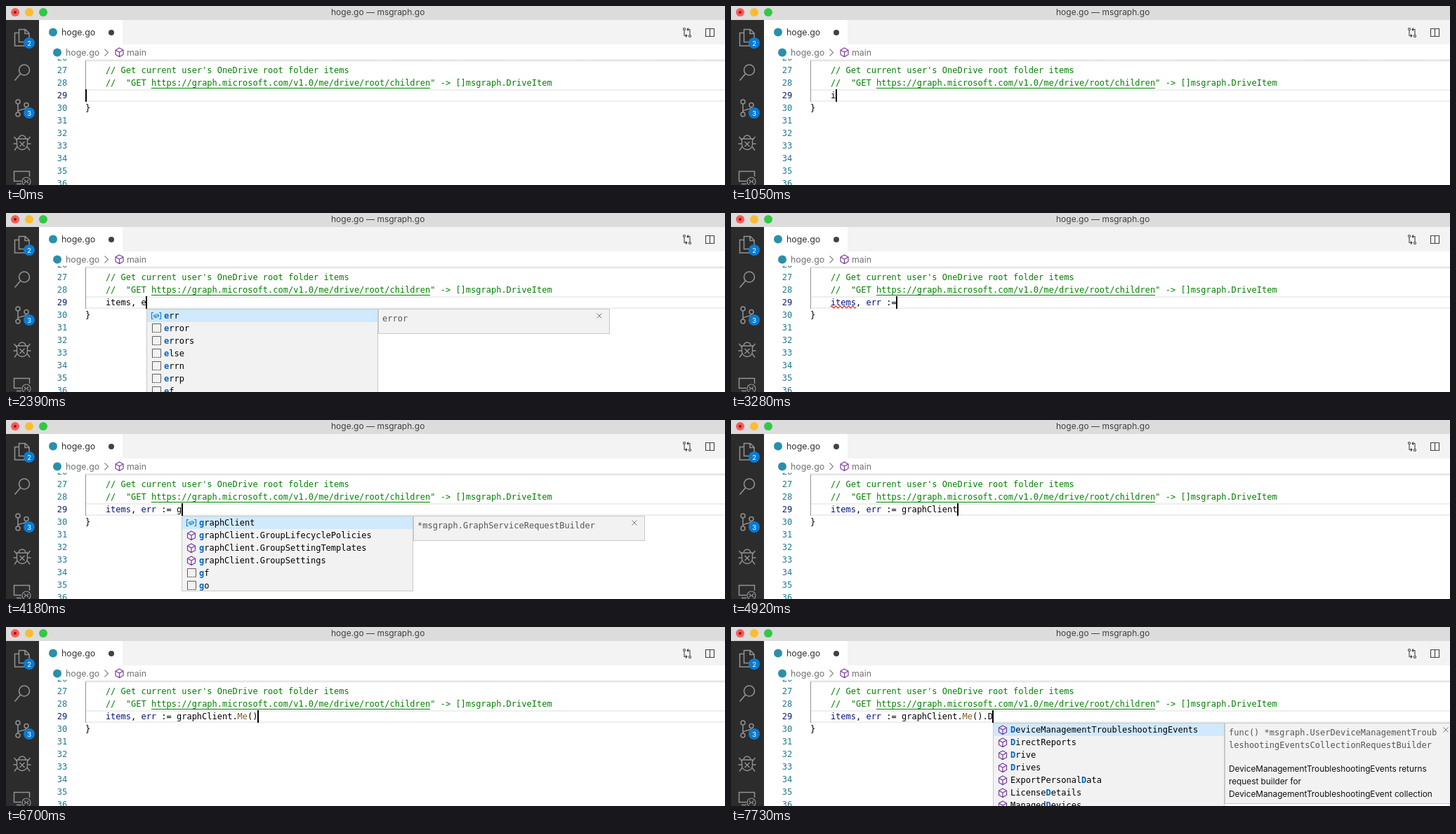
Write an HTML page with a canvas that moves like this. It is 1024 px wide and 256 px high and loops after 8 s.

```html
<!DOCTYPE html>
<html lang="en">
<head>
<meta charset="utf-8">
<title>Editor completion</title>
<style>
html, body { margin: 0; width: 100%; height: 100%; overflow: hidden; background: #fff; }
canvas { display: block; width: 1024px; height: 256px; }
</style>
</head>
<body>
<canvas id="stage" width="1024" height="256"></canvas>
<script>
const ctx = document.getElementById('stage').getContext('2d');
const LOOP = 8000, LEFT = 113, CHAR = 7.22, ROW = 18, LINE_TOP = 119;
const MONO = '12px "DejaVu Sans Mono", monospace';
const ui = size => `${size}px Inter, "Liberation Sans", sans-serif`;
const colX = col => LEFT + col * CHAR;

// Completion entries: icon kind, then the label with [matched] parts.
const bold = (n, prefix, kind, names) =>
  names.map(s => `${kind}:${prefix}[${s.slice(0, n)}]${s.slice(n)}`);
const itemList = n => [
  ...bold(n, 'user.Drive.', 'field', ['Items']),
  ...bold(n, 'msgraph.', 'struct', ['ItemActionStat', 'ItemActivityStat', 'ItemActivity',
    'ItemAnalytics', 'ItemAttachment', 'ItemBody'])
];
const itemsMatch = ['field:user.Drive.[Items]', 'struct:msgraph.[Item]Action[S]tat',
  'struct:msgraph.[Item]Activity[S]tat'];
const errList = n => [
  ...bold(n, '', 'var', ['err']),
  ...bold(n, '', 'keyword', ['error', 'errors'])
];
const eList = [...errList(1), ...bold(1, '', 'keyword', ['else', 'errn', 'errp', 'ef'])];
const graphList = n => [
  ...bold(n, '', 'var', ['graphClient']),
  ...bold(n, '', 'method', ['graphClient.GroupLifecyclePolicies',
    'graphClient.GroupSettingTemplates', 'graphClient.GroupSettings'])
];
const methods = names => names.map(s => 'method:' + s);
const clientList = methods(['AppCatalogs', 'AuditLogs', 'CertificateBasedAuthConfiguration',
  'Communications', 'Contracts', 'DataPolicyOperations', 'DeviceAppManagement']);
const userList = methods(['Activities', 'AgreementAcceptances', 'Analytics',
  'AppRoleAssignments', 'Authentication', 'Calendar', 'CalendarGroups']);
const dList = methods(['[D]eviceManagementTroubleshootingEvents', '[D]irectReports', '[D]rive',
  '[D]rives', 'ExportPersonal[D]ata', 'License[D]etails', 'Managed[D]evices']);

const itemsDoc = { sig: ['[]msgraph.DriveItem'], text: ['Items undocumented'] };
const errDoc = { sig: ['error'], text: [] };
const graphDoc = { sig: ['*msgraph.GraphServiceRequestBuilder'], text: [] };
const meDoc = { sig: ['func() *msgraph.UserRequestBuilder'], text: ['Me is navigation property'] };
const catalogDoc = { sig: ['func() *msgraph.AppCatalogsRequestBuilder'],
  text: ['AppCatalogs is navigation property'] };
const activityDoc = { sig: ['func() *msgraph.UserActivitiesCollection', 'RequestBuilder'],
  text: ['Activities returns request builder for', 'UserActivity collection'] };
const eventsDoc = {
  sig: ['func() *msgraph.UserDeviceManagementTroub', 'leshootingEventsCollectionRequestBuilder'],
  text: ['DeviceManagementTroubleshootingEvents returns', 'request builder for',
    'DeviceManagementTroubleshootingEvent collection']
};

const CALL = 'items, err := graphClient';
const steps = [
  { t: 0, text: null },
  { t: 300, text: '', off: 1 },
  { t: 600, text: '' },
  { t: 900, text: '', off: 1 },
  { t: 1050, text: 'i' },
  { t: 1200, text: 'it', list: itemList(2), doc: itemsDoc },
  { t: 1350, text: 'ite', list: itemList(3), doc: itemsDoc },
  { t: 1500, text: 'item', list: itemList(4), doc: itemsDoc },
  { t: 1640, text: 'items', list: itemsMatch },
  { t: 1790, text: 'items', list: itemsMatch, doc: itemsDoc },
  { t: 2240, text: 'items,' },
  { t: 2390, text: 'items, e', list: eList, doc: errDoc },
  { t: 2540, text: 'items, er', list: errList(2), doc: errDoc },
  { t: 2690, text: 'items, err', list: errList(3), doc: errDoc },
  { t: 2830, text: 'items, err ', wave: 'items' },
  { t: 3280, text: 'items, err :=', wave: 'items' },
  { t: 3430, text: 'items, err := ', wave: 'items' },
  { t: 3580, text: 'items, err := ', wave: 'brace' },
  { t: 4030, text: 'items, err := g' },
  { t: 4180, text: 'items, err := g', doc: graphDoc,
    list: [...graphList(1), ...bold(1, '', 'keyword', ['gf', 'go'])] },
  { t: 4320, text: 'items, err := gr', list: graphList(2), doc: graphDoc },
  { t: 4470, text: 'items, err := gra', list: graphList(3), doc: graphDoc },
  { t: 4920, text: CALL },
  { t: 5370, text: CALL + '.' },
  { t: 5520, text: CALL + '.', wave: 'brace' },
  { t: 5660, text: CALL + '.', wave: 'brace', list: clientList, doc: catalogDoc, bar: 1 },
  { t: 5810, text: CALL + '.M', doc: meDoc,
    list: methods(['[M]e', 'Device[M]anagement', 'DeviceApp[M]anagement']) },
  { t: 6100, text: CALL + '.Me', doc: meDoc,
    list: methods(['[Me]', 'Device[M]anag[e]ment', 'DeviceApp[M]anag[e]ment']) },
  { t: 6550, text: CALL + '.Me' },
  { t: 6700, text: CALL + '.Me()' },
  { t: 6850, text: CALL + '.Me()', off: 1 },
  { t: 7150, text: CALL + '.Me()' },
  { t: 7440, text: CALL + '.Me().' },
  { t: 7590, text: CALL + '.Me().', wave: 'brace', list: userList, doc: activityDoc },
  { t: 7730, text: CALL + '.Me().D', list: dList, doc: eventsDoc }
];

function rect(x, y, w, h, color) {
  ctx.fillStyle = color;
  ctx.fillRect(x, y, w, h);
}
function disc(x, y, r, color) {
  ctx.fillStyle = color;
  ctx.beginPath();
  ctx.arc(x, y, r, 0, 7);
  ctx.fill();
}
function label(text, x, y, color, font = MONO) {
  ctx.font = font;
  ctx.fillStyle = color;
  ctx.fillText(text, x, y);
}
function stroke(path, color, width = 1) {
  ctx.strokeStyle = color;
  ctx.lineWidth = width;
  ctx.stroke(new Path2D(path));
}
function panel(x, y, w, h) {
  rect(x, y, w, h, '#c8c8c8');
  rect(x + 1, y + 1, w - 2, h - 2, '#f2f2f2');
}

const PURPLE = '#7a3a9e', BLUE = '#1a85c9';
const icons = {
  method: () => stroke('M0-6L5.5-3V3.5L0 6.5L-5.5 3.5V-3ZM-5.5-3L0 0L5.5-3M0 0V6.5', PURPLE, 1.2),
  field: () => stroke('M-6.5-1L1-4.5L6.5-2V2L-1 5.5L-6.5 3ZM-6.5-1L-1 1.5L6.5-2M-1 1.5V5.5', BLUE, 1.2),
  struct: () => stroke('M-6.5-4.5H6.5V-1H-6.5ZM-6.5 2H-2V5.5H-6.5ZM2 2H6.5V5.5H2Z', '#505050', 1.1),
  var() {
    stroke('M-4-4.5H-6.5V4.5H-4M4-4.5H6.5V4.5H4', BLUE, 1.2);
    stroke('M-3.5-.5L1-2.5L3.5-1V1L-1 3L-3.5 1.5ZM-3.5-.5L-1 .8L3.5-1M-1 .8V3', BLUE);
  },
  keyword() {
    stroke('M-5.5 5.5V-6.5H6.5V5.5', '#606060');
    ctx.setLineDash([1.5, 1]);
    stroke('M-5.5 5.5H6.5', '#404040', 1.2);
    ctx.setLineDash([]);
  }
};
function icon(kind, x, y) {
  ctx.save();
  ctx.translate(x, y);
  icons[kind]();
  ctx.restore();
}

function drawChrome() {
  rect(0, 0, 1024, 20, '#dcdcdc');
  ['#fc5b57', '#fdbc2f', '#33c748'].forEach((c, i) => disc(13 + 20 * i, 9, 6, c));
  disc(13, 9, 2, '#8c1a10');
  label('hoge.go — msgraph.go', 463, 13, '#404040', ui(12));

  rect(47, 20, 977, 35, '#f3f3f3');
  rect(47, 20, 119, 35, '#fff');
  disc(67, 37.5, 6, '#2b8fab');
  label('hoge.go', 79, 42, '#333', ui(12.4));
  disc(150, 38, 4, '#424242');
  stroke('M966 35V42.5H970M968 40.5L970 42.5L968 44.5M974 41V33.5H970M972 31.5L970 33.5L972 35.5', '#424242', 1.1);
  stroke('M964.5 33a1.5 1.5 0 1 0 3 0a1.5 1.5 0 1 0-3 0M972.5 43a1.5 1.5 0 1 0 3 0a1.5 1.5 0 1 0-3 0', '#424242', 1.1);
  stroke('M996.5 32.5H1008.5V43.5H996.5ZM1002.5 32.5V43.5', '#424242', 1.1);

  disc(73, 66.5, 6, '#2b8fab');
  label('hoge.go', 85, 71, '#717171', ui(12.4));
  stroke('M140.5 61.5L145.5 66.5L140.5 71.5', '#808080', 1.1);
  icon('method', 161.5, 66);
  label('main', 172, 71, '#717171', ui(12.4));
}

function badge(text, y) {
  disc(33, y, 8, '#0a7bd2');
  label(text, 30.2, y + 3.5, '#fff', ui(9.5));
}
function drawSidebar() {
  const gray = '#929292';
  rect(0, 20, 47, 236, '#2c2c2c');
  stroke('M18.5 33.5H27.5L33 39V51.5H18.5ZM27 34V39.5H33M18 38.5H12.5V57H26.5V52', gray, 1.5);
  badge('2', 53);
  stroke('M18.5 91.5a7.5 7.5 0 1 0 15 0a7.5 7.5 0 1 0-15 0M20.5 97L12.5 106.5', gray, 1.6);
  stroke('M14 137a3 3 0 1 0 6 0a3 3 0 1 0-6 0M14 155a3 3 0 1 0 6 0a3 3 0 1 0-6 0M26 141.5a3 3 0 1 0 6 0a3 3 0 1 0-6 0M17 140V152M29 144.5C29 149 18 147 17 151', gray, 1.5);
  badge('3', 153);
  stroke('M15.5 190H30.5V198a7.5 7.5 0 0 1-15 0ZM18 190a5 5 0 0 1 10 0M15.5 192L11.5 187M30.5 192L34.5 187M15.5 197H10.5M30.5 197H35.5M16 201L12 206.5M30 201L34 206.5M19.5 194L26.5 201M26.5 194L19.5 201', gray, 1.4);
  stroke('M22 250.5H11.5V236.5H33.5V244M15 254.5H22', gray, 1.5);
  stroke('M23 251a6 6 0 1 0 12 0a6 6 0 1 0-12 0M26 248.5L28.3 251L26 253.5M32 248.5L29.7 251L32 253.5', gray, 1.2);
}

function drawEditor() {
  rect(47, 55, 977, 201, '#fff');
  for (let n = 26; n <= 36; n++) {
    label(n, 72.8, 132 + (n - 29) * ROW, n === 29 ? '#0b216f' : '#237893');
  }
  rect(47, 55, 66, 20.5, '#fff');
  const shade = ctx.createLinearGradient(0, 76, 0, 80);
  shade.addColorStop(0, 'rgba(0,0,0,0)');
  shade.addColorStop(.4, 'rgba(0,0,0,.13)');
  shade.addColorStop(1, 'rgba(0,0,0,0)');
  rect(LEFT, 76, 911, 4, shade);

  const green = '#008000';
  label("// Get current user's OneDrive root folder items", colX(4), 96, green);
  label('//  "GET https://graph.microsoft.com/v1.0/me/drive/root/children" -> []msgraph.DriveItem',
    colX(4), 114, green);
  rect(colX(13), 117, 55 * CHAR, 1, green);
  rect(LEFT, 119, 911, 2, '#eee');
  rect(LEFT, 135, 911, 2, '#eee');
  rect(LEFT, 78, 1, 41, '#939393');
  label('}', LEFT, 150, '#000');
}

function wave(x, y, width) {
  ctx.beginPath();
  for (let d = 0; d <= width; d += .5) ctx.lineTo(x + d, y - 1.4 * Math.sin(d * Math.PI / 3));
  ctx.strokeStyle = '#e51400';
  ctx.lineWidth = 1.1;
  ctx.stroke();
}

function drawCode(text) {
  const assign = text.indexOf(':=');
  for (const m of text.matchAll(/\w+|[^\w\s]+/g)) {
    const next = text[m.index + m[0].length];
    const isName = /\w/.test(m[0]);
    const color = isName && m.index < assign ? '#001080' : isName && next === '(' ? '#795e26' : '#000';
    label(m[0], colX(4 + m.index), 132, color);
  }
}

function drawList(x, list, bar) {
  panel(x, 137, 330, list.length * ROW);
  rect(x + 1, 138, 328, 18, '#d0e9fd');
  if (bar) rect(x + 319, 138, 10, 66, 'rgba(100,100,100,.12)');
  list.forEach((entry, i) => {
    const [kind, name] = entry.split(':');
    const y = 147 + i * ROW;
    let tx = x + 25;
    icon(kind, x + 14, y);
    name.split(/[\[\]]/).forEach((part, j) => {
      label(part, tx, y + 4, j % 2 ? '#0066bf' : '#000', j % 2 ? 'bold ' + MONO : MONO);
      tx += part.length * CHAR;
    });
  });
}

function drawDoc(x, { sig, text }) {
  const height = ROW * (sig.length + 1) + (text.length ? 8 + ROW * text.length : 0);
  panel(x, 137, 330, height);
  sig.forEach((s, i) => label(s, x + 6, 155 + i * ROW, '#555'));
  text.forEach((s, i) => label(s, x + 6, 171 + (sig.length + i) * ROW - (text.length ? 0 : 8), '#111', ui(11.8)));
  stroke(`M${x + 311.5} 143.5l7 7m0-7l-7 7`, '#777');
}

function draw(time) {
  const step = steps.findLast(s => s.t <= time);
  const typed = step.text !== null;
  const end = colX(typed ? 4 + step.text.length : 0);
  drawEditor();
  if (typed) {
    rect(LEFT, LINE_TOP, 1, ROW, '#939393');
    drawCode(step.text);
  }
  if (step.wave === 'items') wave(colX(4), 134.5, 36);
  if (step.wave === 'brace') wave(LEFT, 152.5, CHAR);
  if (!step.off) rect(Math.floor(end), LINE_TOP, 2, ROW, '#000');
  const x = Math.round(end);
  if (step.doc) drawDoc(x + 330, step.doc);
  if (step.list) drawList(x, step.list, step.bar);
  drawChrome();
  drawSidebar();
}

const start = performance.now();
function tick() {
  draw((performance.now() - start) % LOOP);
  requestAnimationFrame(tick);
}
tick();
</script>
</body>
</html>
```
